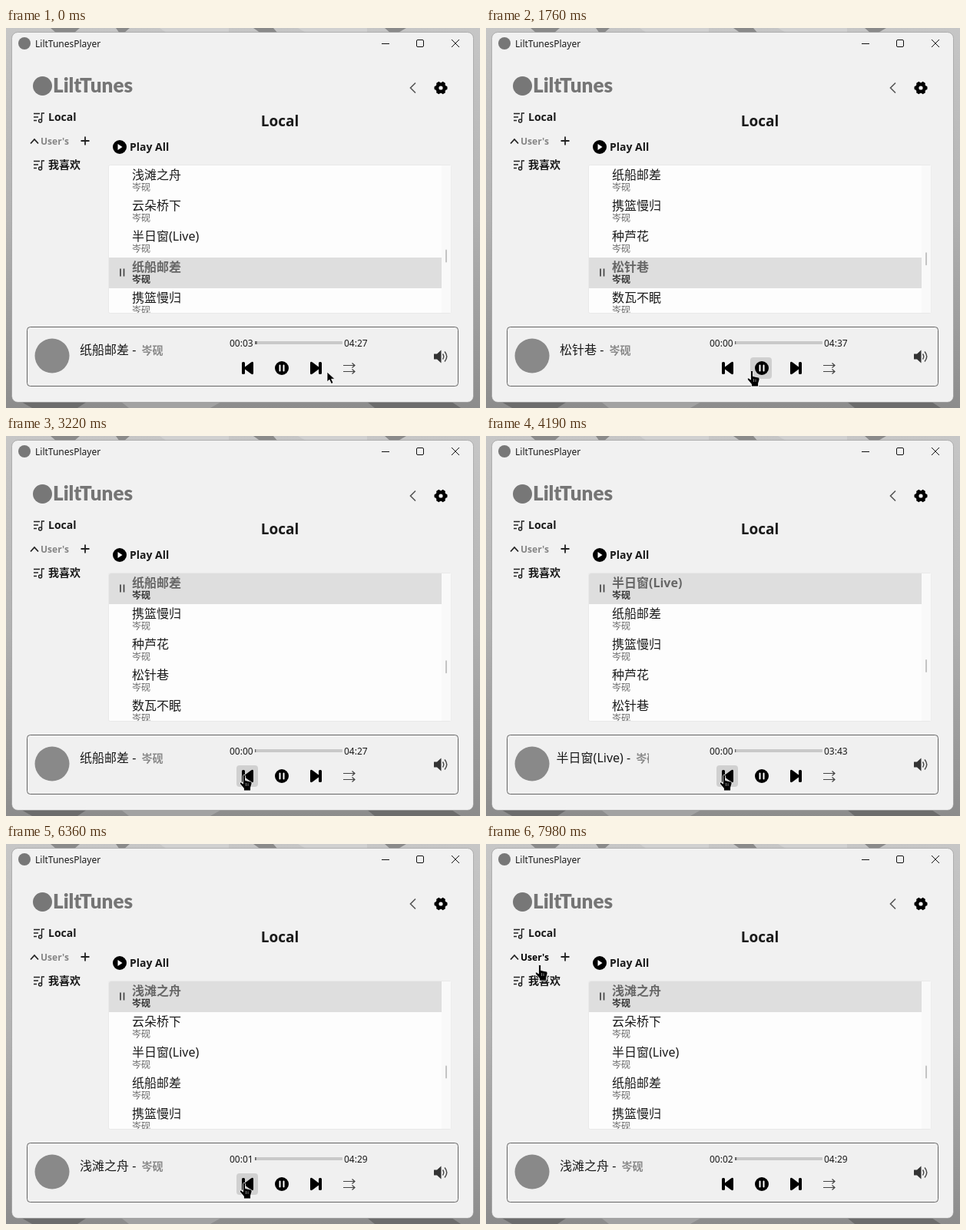
These frames come from a looping animation (617 by 495 pixels, 8000 ms). An HTML page:

```html
<!DOCTYPE html>
<html lang="zh-CN">
<head>
<meta charset="utf-8">
<title>LiltTunesPlayer</title>
<style>
html, body { margin: 0; width: 100%; height: 100%; overflow: hidden; background: #b4b4b4; }
svg { display: block; }
text { font: 12px "Noto Sans", "Noto Sans CJK SC", "Noto Sans CJK", sans-serif; fill: #1a1a1a; white-space: pre; }
.b { font-weight: 700; }
.m { font-size: 14px; }
.line { fill: none; stroke: #222; stroke-width: 1.4; }
.row .bg { fill: transparent; }
.row .song { font-size: 16px; }
.row .artist { fill: #666; }
.row .bars { display: none; }
.row.hover .bg { fill: #efefef; }
.row.active .bg { fill: #dedede; }
.row.active text { font-weight: 700; }
.row.active .song { fill: #666; }
.row.active .artist { fill: #333; }
.row.active .bars { display: block; }
#title { font-size: 16px; }
#title .by { font-size: 14px; font-weight: 700; fill: #888; }
#users { fill: #858585; }
#users.hover { fill: #000; }
</style>
</head>
<body>
<svg width="617" height="495" viewBox="0 0 617 495">
  <defs>
    <linearGradient id="side" x2="0" y2="1">
      <stop offset="0" stop-color="#c6c6c6"/><stop offset=".5" stop-color="#b2b2b2"/>
      <stop offset="1" stop-color="#8c8c8c"/>
    </linearGradient>
    <clipPath id="listClip"><rect x="134" y="179" width="445" height="192" rx="2"/></clipPath>
    <clipPath id="titleClip"><rect x="91" y="405" width="121" height="32"/></clipPath>
    <g id="note" class="line">
      <path d="M0 1.5H8M0 6H6M0 10.5H4M10.5 11V1H14"/><circle cx="8.6" cy="11" r="2"/>
    </g>
  </defs>

  <!-- desktop -->
  <rect width="617" height="495" fill="url(#side)"/>
  <path d="M58 0h38l-8 7H66zM143 0h18l-8 7h-5zM322 0h26l6 7h-22zM493 0h28l-12 7h-8z" fill="#8a8a8a"/>
  <path d="M200 0h90v7h-80zM380 0h90v7h-78z" fill="#d0d0d0"/>
  <path d="M20 487h85l-12 8H34zM470 487h110l12 8H480z" fill="#6c6c6c"/>
  <path d="M150 487h130l-14 8H160z" fill="#a2a2a2"/>

  <!-- window -->
  <rect x="7.5" y="5.5" width="601" height="482" rx="8" fill="#f1f1f1" stroke="#8f8f8f" stroke-opacity=".6"/>
  <circle cx="24" cy="20" r="8" fill="#777"/>
  <text x="38" y="25">LiltTunesPlayer</text>
  <g fill="none" stroke="#111">
    <path d="M489 20.5h10M580 15l10 10M590 15l-10 10"/>
    <rect x="534.5" y="15.5" width="9" height="9" rx="1.5"/>
  </g>

  <circle cx="47.5" cy="75.5" r="12.5" fill="#777"/>
  <text x="61" y="84" style="font:900 26px Lato,sans-serif;fill:#757575">LiltTunes</text>
  <path class="line" d="M533 71.5l-6.5 6.5 6.5 6.5" style="stroke:#555;stroke-width:1.6"/>
  <g transform="translate(566 78)">
    <g id="teeth"></g>
    <circle r="4.8" fill="none" stroke="#000" stroke-width="4.4"/>
  </g>

  <!-- sidebar -->
  <use href="#note" x="36" y="110"/>
  <text class="b m" x="55" y="120.5">Local</text>
  <path class="line" d="M32 150.5l5-5.5 5 5.5" style="stroke-width:1.8"/>
  <text id="users" class="b" x="45" y="152">User's</text>
  <path class="line" d="M97.5 147h11M103 141.5v11" style="stroke-width:1.8"/>
  <use href="#note" x="36" y="172"/>
  <text class="b m" x="55" y="183">我喜欢</text>

  <!-- list -->
  <text class="b" x="356.5" y="128" text-anchor="middle" style="font-size:19px">Local</text>
  <circle cx="148" cy="155" r="9"/>
  <path d="M145.5 151l6 4-6 4z" fill="#fff"/>
  <text class="b m" x="161" y="160">Play All</text>
  <rect x="133.5" y="178.5" width="445.5" height="193" rx="2" fill="#fdfdfd" stroke="#e9e9e9"/>
  <rect x="567" y="179" width="12" height="192" fill="#f9f9f9"/>
  <g id="list" clip-path="url(#listClip)"></g>
  <rect id="thumb" x="572" width="2" height="17" rx="1" fill="#c4c4c4"/>

  <!-- player -->
  <rect x="27.5" y="389.5" width="561" height="77" rx="4" fill="#f0f0f0" stroke="#666"/>
  <circle cx="60" cy="427" r="22.5" fill="#898989"/>
  <g clip-path="url(#titleClip)"><text id="title" y="425"><tspan id="name"></tspan><tspan> - </tspan><tspan class="by" dx="3" id="by"></tspan></text></g>
  <text id="elapsed" x="291" y="415"></text>
  <text id="total" x="440" y="415"></text>
  <rect x="324" y="408" width="114" height="4" rx="1" fill="#c9c9c9"/>
  <rect id="fill" x="324" y="408" height="4" fill="#666"/>
  <rect id="glow" y="429" width="28" height="28" rx="4" fill="#d0d0d0"/>
  <path id="prev" d="M307 436.5q0-1.5 1.5-1.5h1q1.5 0 1.5 1.5v5l8-6q3-2 3 1v13q0 3-3 1l-8-6v5q0 1.5-1.5 1.5h-1q-1.5 0-1.5-1.5z"/>
  <use href="#prev" transform="translate(718 0) scale(-1 1)"/>
  <circle cx="359" cy="443" r="9"/>
  <path d="M356.5 439.5v7M361.5 439.5v7" stroke="#fff" stroke-width="2" stroke-linecap="round"/>
  <path class="line" d="M439 439.5h15m-3.5-3l3.5 3-3.5 3M439 447.5h15m-3.5-3l3.5 3-3.5 3" style="stroke:#444;stroke-width:1.2"/>
  <path d="M557 424.5h4l5.5-5v17l-5.5-5h-4z" fill="#333"/>
  <path class="line" d="M568.5 424.5q2.5 3.500 0 7M571 421.5q5.5 6.500 0 13" style="stroke:#444"/>

  <path id="arrow" d="M0 0v13l3-2.8 2.5 5.3 2.5-1.2-2.4-5H10z" stroke="#fff" stroke-width=".8"/>
  <g id="hand">
    <path d="M-1.5 1.5q1.5-3 3 0v6l7 1.6q2 .7 1.5 3L8.5 17v4H-.5v-3l-5-6q-1-2.500 1.5-2l2.5 2z" stroke="#fff" stroke-width=".8"/>
    <path d="M2.5 11v4M5 11.5v3.5" stroke="#bbb" stroke-width=".7"/>
  </g>
</svg>
<script>
const LOOP = 8000, STEP = 70, ROW = 40, TOP = 179, VISIBLE = 4;
const ARTIST = "岑砚";
const songs = [
  ["浅滩之舟", 269], ["云朵桥下", 232], ["半日窗(Live)", 223], ["纸船邮差", 267],
  ["携篮慢归", 241], ["种芦花", 242], ["松针巷", 277], ["数瓦不眠", 255]
];
// [start time, song index]
const plays = [[-3300, 3], [420, 4], [980, 5], [1400, 6], [2240, 5],
  [2740, 4], [3100, 3], [3690, 2], [4430, 1], [4990, 0]];
// [time, x, y] of the pointer tip
const path = [[0, 418, 448], [70, 418, 448], [280, 404, 446], [1480, 404, 446], [1760, 344, 446],
  [1980, 318, 446], [2530, 318, 446], [2740, 310, 441], [7560, 310, 441], [7980, 70, 157]];
const buttons = [300, 344, 389, 433];

const $ = id => document.getElementById(id);
const clock = s => [s / 60, s % 60].map(n => String(Math.floor(n)).padStart(2, "0")).join(":");
const inside = ([x, y], left, top, w, h) => x >= left && x <= left + w && y >= top && y < top + h;

$("teeth").innerHTML = Array.from({ length: 6 }, (_, i) =>
  `<rect x="-2.5" y="-8.5" width="5" height="5" rx="1.5" transform="rotate(${i * 60 + 30})"/>`).join("");
$("list").innerHTML = songs.map(([name]) => `<g class="row">
  <rect class="bg" x="134" width="433" height="${ROW}"/>
  <path class="bars" d="M149 14.5v10M153.5 14.5v10" stroke="#444" stroke-width="1.7"/>
  <text class="song" x="164" y="18">${name}</text>
  <text class="artist" x="164" y="33">${ARTIST}</text></g>`).join("");
$("by").textContent = ARTIST;
const rows = [...document.querySelectorAll(".row")];

function pointerAt(t) {
  const i = path.findIndex(p => p[0] > t);
  if (i < 0) return path.at(-1).slice(1);
  const [a, b] = [path[i - 1], path[i]];
  const k = (t - a[0]) / (b[0] - a[0]);
  return [1, 2].map(n => Math.round(a[n] + (b[n] - a[n]) * k));
}

// Replays the song changes, scrolling just enough to keep the current row in view.
function playbackAt(t) {
  let first = 0, current, start;
  for (const [time, song] of plays) {
    if (time > t) break;
    [start, current] = [time, song];
    first = Math.max(song - VISIBLE + 1, Math.min(first, song));
  }
  return { first, current, age: t - start };
}

function draw(t) {
  const { first, current, age } = playbackAt(t);
  const tip = pointerAt(t);
  const [name, length] = songs[current];
  const seconds = Math.floor(age / 1000);

  const inList = inside(tip, 134, TOP, 433, 192);
  rows.forEach((row, i) => {
    const y = TOP + (i - first) * ROW;
    row.setAttribute("transform", `translate(0 ${y})`);
    row.classList.toggle("active", i === current);
    row.classList.toggle("hover", inList && inside(tip, 134, y, 433, ROW));
  });
  $("thumb").setAttribute("y", 288.5 + first * 1.25);

  $("name").textContent = name;
  $("title").setAttribute("x", 96 - (name.length > 5 ? age / 100 : 0));
  $("elapsed").textContent = clock(seconds);
  $("total").textContent = clock(length);
  $("fill").setAttribute("width", 1.2 + seconds * 0.5);

  const button = buttons.find(x => inside(tip, x, 429, 28, 28));
  const onUsers = inside(tip, 28, 138, 84, 20);
  $("glow").style.display = button ? "" : "none";
  if (button) $("glow").setAttribute("x", button);
  $("users").classList.toggle("hover", onUsers);

  const pointing = Boolean(button || onUsers || inList);
  for (const id of ["arrow", "hand"]) {
    $(id).setAttribute("transform", `translate(${tip})`);
    $(id).style.display = (id === "hand") === pointing ? "" : "none";
  }
}

const began = performance.now();
function tick() {
  const t = (performance.now() - began) % LOOP;
  draw(Math.floor(t / STEP) * STEP);
  requestAnimationFrame(tick);
}
tick();
</script>
</body>
</html>
```
